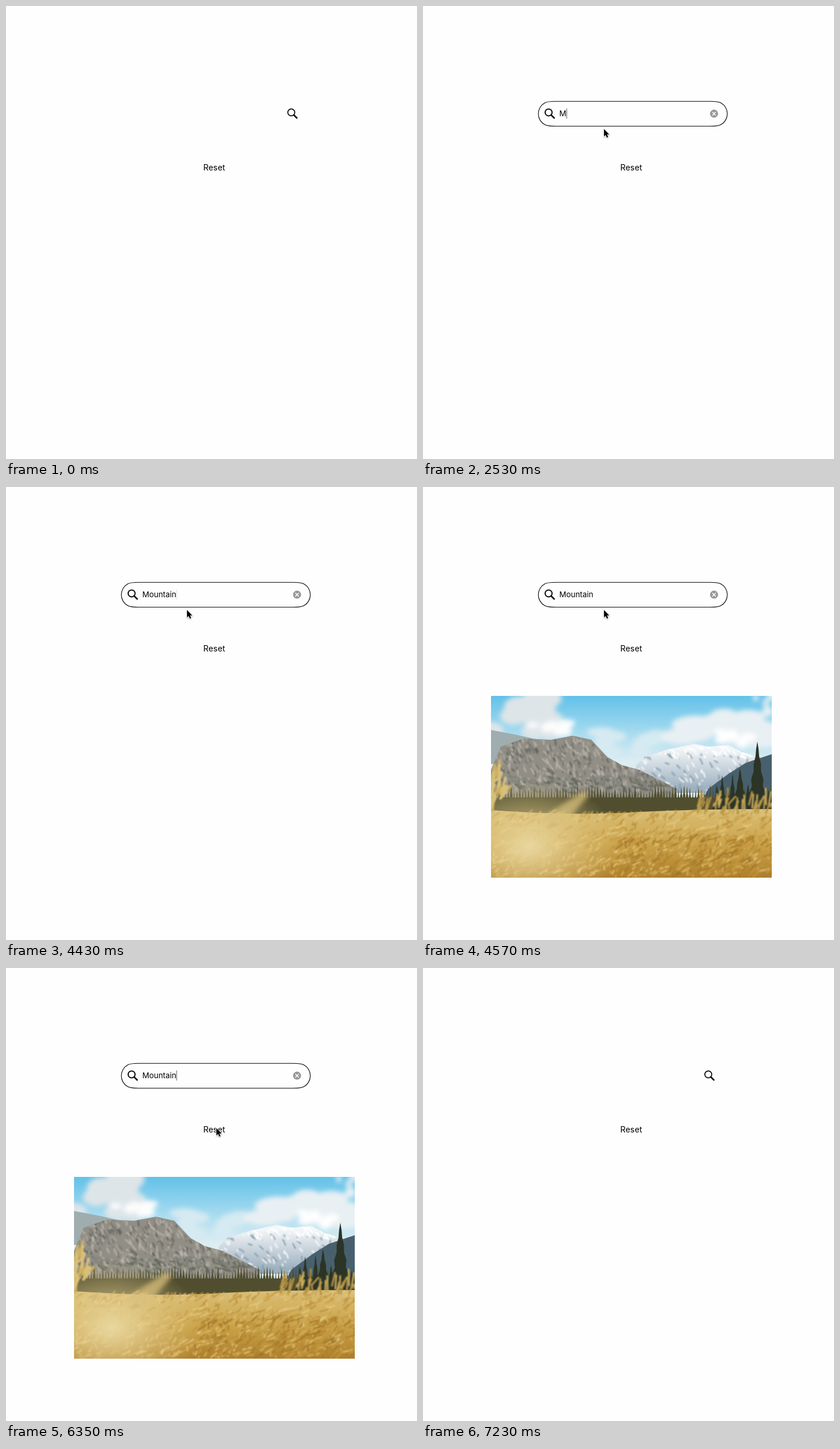
Animation, 713 px wide and 785 px high, one loop 7.83 s. Source, as an HTML page:

```html
<!DOCTYPE html>
<html lang="en">
<head>
<meta charset="utf-8">
<title>Search field</title>
<style>
  html, body { margin: 0; width: 100%; height: 100%; overflow: hidden; background: #fefefe; }
  svg { display: block; width: 713px; height: 785px; }
  text { font: 13.3px Inter, "Liberation Sans", sans-serif; white-space: pre; }
  #reset { font-size: 14.2px; letter-spacing: .1px; }
  #pointer { filter: drop-shadow(0 1px 1px rgba(0, 0, 0, .35)); }
</style>
</head>
<body>
<svg viewBox="0 0 713 785">
  <defs>
    <linearGradient id="sky" x2="0" y2="1">
      <stop offset="0" stop-color="#62c1e8"/><stop offset=".18" stop-color="#9ed8ef"/><stop offset=".36" stop-color="#dcedf2"/>
    </linearGradient>
    <linearGradient id="field" x2="0" y2="1">
      <stop offset="0" stop-color="#dabf78"/><stop offset=".5" stop-color="#cba44b"/><stop offset="1" stop-color="#ae7f2a"/>
    </linearGradient>
    <radialGradient id="haze" cx=".2" cy=".62" r=".5">
      <stop offset="0" stop-color="#e9d79f"/><stop offset="1" stop-color="#e2ca88" stop-opacity="0"/>
    </radialGradient>
    <linearGradient id="ice" x2="0" y2="1">
      <stop offset=".1" stop-color="#f3f6f8"/><stop offset=".9" stop-color="#9db0bf"/>
    </linearGradient>
    <filter id="soft" x="-30%" y="-30%" width="160%" height="160%"><feGaussianBlur stdDeviation="4"/></filter>
    <filter id="blur" x="-30%" y="-30%" width="160%" height="160%"><feGaussianBlur stdDeviation="1"/></filter>
    <clipPath id="frame"><rect x="118" y="362" width="487" height="315"/></clipPath>
    <path id="rock" d="M118 490L135 450 175 436 222 438 260 431 292 438 320 468 345 482 375 490 440 523V550H118Z"/>
    <path id="snow" d="M365 488L383 468 425 455 470 445 495 450 530 447 552 459 605 475V530H420Z"/>
    <clipPath id="rockClip"><use href="#rock"/></clipPath>
    <clipPath id="snowClip"><use href="#snow"/></clipPath>
  </defs>

  <g id="photo" clip-path="url(#frame)" display="none">
    <rect x="118" y="362" width="487" height="315" fill="url(#sky)"/>
    <g id="clouds" filter="url(#soft)"/>
    <path d="M118 421L160 429 210 440V480H118Z" fill="#a0adae"/>
    <use href="#snow" fill="url(#ice)"/>
    <g id="snowMarks" clip-path="url(#snowClip)" filter="url(#blur)"/>
    <use href="#rock" fill="#918e86"/>
    <g id="rockMarks" clip-path="url(#rockClip)" filter="url(#blur)"/>
    <path d="M495 523L530 497 560 478 605 463V550H480Z" fill="#48606d"/>
    <path id="forest" fill="#504e2e"/>
    <path id="firs" fill="#2b3426"/>
    <path d="M118 560Q260 570 360 564T605 558V677H118Z" fill="url(#field)"/>
    <g id="grass" filter="url(#blur)"/>
    <rect x="118" y="480" width="320" height="230" fill="url(#haze)"/>
    <path d="M205 575L278 526 288 534 240 590Z" fill="#d9c07c" opacity=".75" filter="url(#soft)"/>
    <g id="stalks" filter="url(#blur)"/>
  </g>

  <path id="border" pathLength="1" fill="none" stroke="#000" stroke-width="1.1"
    d="M230 165.3H498C504 165.3 511.75 165.3 516.5 167.8A21.5 21.5 0 0 1 516.5 205.8C511.75 208.3 504 208.3 498 208.3H230C224 208.3 216.2 208.3 211.5 205.8A21.5 21.5 0 0 1 211.5 167.8C216.2 165.3 224 165.3 230 165.3"/>
  <g id="icon" fill="none" stroke="#0a0a0a">
    <circle id="ring" cx="6.9" cy="184.4" r="6"/>
    <path d="M11.3 188.9L16.5 194" stroke-width="2.7" stroke-linecap="round"/>
  </g>
  <text id="hint" y="191" fill="#a9a9a9">Search...</text>
  <text id="typed" x="236.6" y="191"></text>
  <rect id="caret" y="177.5" width="1" fill="#222"/>
  <g id="clear">
    <circle cx="504.9" cy="186.6" r="7" fill="#98989c"/>
    <path d="M502.3 184l5.2 5.2m0-5.2l-5.2 5.2" stroke="#fff" stroke-width="1.5" stroke-linecap="round"/>
  </g>
  <text id="reset" x="342.2" y="284.6">Reset</text>
  <path id="pointer" d="M0 0V12.8L2.9 10.1 5 14.7 7.2 13.7 5.2 9.3H9.2Z" stroke="#fff" stroke-width="1.4" paint-order="stroke"/>
</svg>
<script>
const LOOP = 7830;
const BEAT = 146.9; // the picture is held for one beat at a time
const WORD = "Mountain";

const el = id => document.getElementById(id);
const set = (id, attrs) => {
  for (const k in attrs) el(id).setAttribute(k, attrs[k]);
};
const show = (id, on) => set(id, { display: on ? "inline" : "none" });

const clamp = (v, lo = 0, hi = 1) => Math.min(hi, Math.max(lo, v));
const ease = (b, from, to) => {
  const x = clamp((b - from) / (to - from));
  return x * x * (3 - 2 * x);
};

// Pointer stops: beat, x, y.
const stops = [
  [3, 520, 138], [6, 497, 183.5], [12, 497, 183.5], [15, 314, 213.3],
  [35, 314, 213.3], [39, 361, 299], [41, 365, 277.5]
];

function pointerAt(b) {
  let [, x, y] = stops[0];
  for (let i = 1; i < stops.length; i++) {
    const p = ease(b, stops[i - 1][0], stops[i][0]);
    x += p * (stops[i][1] - stops[i - 1][1]);
    y += p * (stops[i][2] - stops[i - 1][2]);
  }
  return `translate(${x} ${y})`;
}

let seed = 7;
const rnd = () => (seed = seed * 16807 % 2147483647) / 2147483647;
const between = (a, b) => a + rnd() * (b - a);

function add(id, tag, attrs) {
  const node = document.createElementNS("http://www.w3.org/2000/svg", tag);
  for (const k in attrs) node.setAttribute(k, attrs[k]);
  el(id).append(node);
}

// Short strokes spread over a box, one path per colour.
function scatter(id, colors, n, [x, y, w, h], dx, dy, width) {
  for (const stroke of colors) {
    let d = "";
    for (let i = 0; i < n; i++) {
      d += `M${x + w * rnd()} ${y + h * rnd()}l${dx * between(-.2, 1.5)} ${dy * between(.4, 1.4)}`;
    }
    add(id, "path", { d, stroke, "stroke-width": width, fill: "none" });
  }
}

function cloud(fill, n, x, y, w, h) {
  for (let i = 0; i < n; i++) {
    add("clouds", "ellipse", {
      cx: x + w * rnd(), cy: y + h * rnd(), rx: between(.15, .25) * w, ry: between(.2, .35) * h, fill
    });
  }
}

// A zigzag conifer that widens towards its base.
function fir(x, top, base, half) {
  const side = [];
  for (let i = 1; i <= 8; i++) {
    side.push([half * (i / 8) * (i % 2 ? 1 : .75), top + (base - top) * i / 8]);
  }
  const right = side.map(([w, y]) => `L${x + w} ${y}`).join("");
  const left = side.reverse().map(([w, y]) => `L${x - w} ${y}`).join("");
  return `M${x} ${top}${right}${left}Z`;
}

function paintPhoto() {
  cloud("#dde5e8", 16, 120, 362, 110, 66);
  cloud("#fcfdfd", 9, 185, 403, 65, 24);
  cloud("#d6eaf2", 8, 300, 425, 120, 35);
  cloud("#e8f0f3", 16, 440, 398, 165, 45);
  cloud("#e8f0f3", 6, 575, 362, 30, 30);
  cloud("#fff", 7, 505, 424, 60, 22);

  scatter("rockMarks", ["#62645c", "#aaa59b", "#77776e", "#bab4a9"], 130, [118, 430, 310, 95], 5, 8, 2.5);
  scatter("rockMarks", ["#656b5c", "#80837a"], 70, [118, 500, 320, 30], 9, 3, 3);
  scatter("snowMarks", ["#7f96a9", "#fff"], 60, [365, 460, 240, 65], 6, 7, 2);
  scatter("snowMarks", ["#fff"], 45, [420, 446, 150, 20], 6, 5, 3);

  let forest = "M118 570V538H605V570Z";
  for (let x = 118; x < 605; x += 5) forest += fir(x, between(515, 530), 565, between(4, 6));
  set("forest", { d: forest });
  let firs = fir(580, 441, 545, 17) + fir(550, 487, 560, 14);
  for (let x = 510; x < 610; x += 9) firs += fir(x, between(495, 525), 562, 9);
  set("firs", { d: firs });

  scatter("grass", ["#e2c77c", "#b98f3a", "#d6b25a", "#c69d46"], 220, [118, 566, 487, 111], 12, -7, 2.2);
  scatter("grass", ["#a1762a", "#c4943a", "#b0832f"], 70, [330, 610, 275, 67], 14, -9, 2.5);
  scatter("stalks", ["#c9ab5c", "#b89547"], 22, [470, 550, 135, 20], 9, -22, 3);
  scatter("stalks", ["#cdb160", "#d8c07a"], 14, [112, 500, 26, 70], 12, -28, 4);
}

function draw(t) {
  const b = Math.floor(t / BEAT);
  const open = ease(b, 7.6, 12) - ease(b, 43.6, 48);
  const slide = open ** 1.12;
  const x = 488 - 277 * slide;
  const resting = b >= 44;
  const word = resting ? "" : WORD.slice(0, clamp(b - 16, 0, 4) + clamp(b - 22, 0, 4));

  show("border", open > 0);
  set("border", { "stroke-dasharray": open < 1 ? `${open} 2` : "none" });
  set("icon", { transform: `translate(${x} 0)` });
  set("ring", { "stroke-width": open > 0 ? 2 : 1.7 });

  show("hint", open > 0 && !word);
  set("hint", { x: x + 25.3, opacity: clamp(slide * 1.8) });
  if (el("typed").textContent !== word) el("typed").textContent = word;
  show("clear", word);

  const blink = b > 27 ? clamp(.5 + 1.3 * Math.cos((b - 28) * 2 * Math.PI / 7)) : 1;
  show("caret", !resting);
  set("caret", {
    x: word ? 236.8 + el("typed").getComputedTextLength() : x + 25,
    height: 17.5 * open,
    opacity: .75 * open * blink
  });

  show("photo", b >= 31 && !resting);
  show("pointer", b >= 3 && b < 49);
  set("pointer", { transform: pointerAt(b) });
}

paintPhoto();
const start = performance.now();
function tick() {
  draw((performance.now() - start) % LOOP);
  requestAnimationFrame(tick);
}
tick();
</script>
</body>
</html>
```
